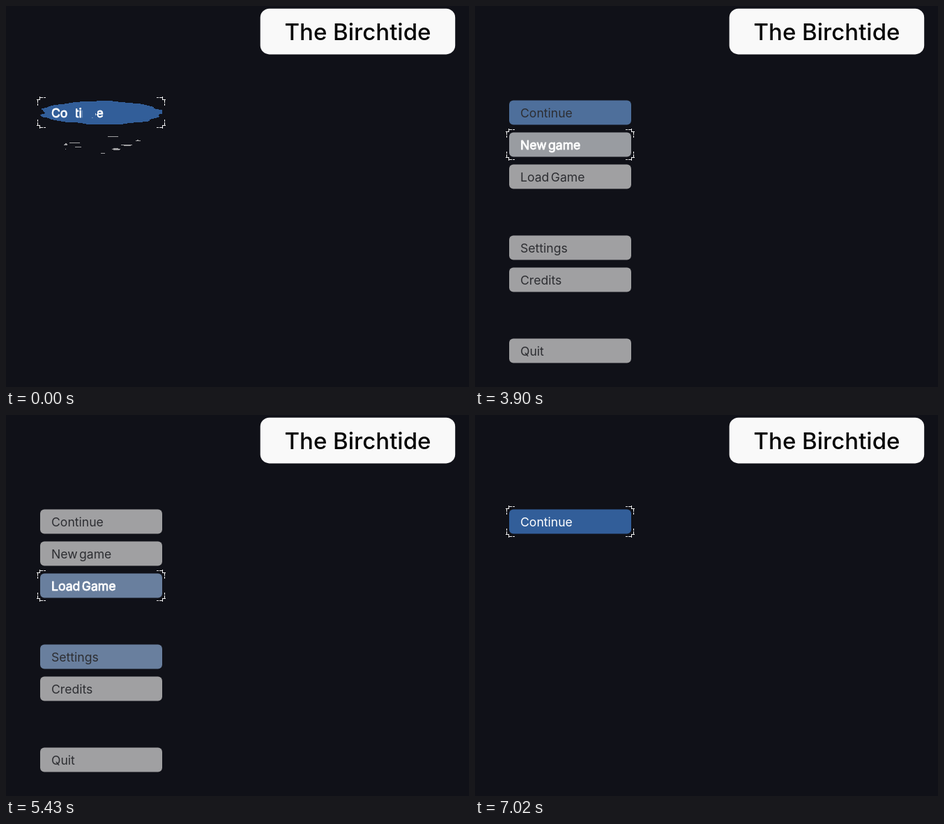
Recreate the animation shown at these times as an HTML page with a canvas. Size 664 px wide and 547 px high, loop 8.49 s.

```html
<!DOCTYPE html>
<html lang="en">
<head>
<meta charset="utf-8">
<title>Game menu</title>
<style>
html, body { margin: 0; width: 100%; height: 100%; overflow: hidden; background: #101118; }
canvas { display: block; }
</style>
</head>
<body>
<canvas id="stage" width="664" height="547"></canvas>
<script>
const LOOP = 8490, STEP = 30;
const LEFT = 49, W = 175, H = 35;
const GRAY = [160, 160, 162], BLUE = [50, 94, 153], PRESSED = [72, 124, 174];
const FONT = '400 17.6px Inter, "Open Sans", sans-serif';
const STAGGER = 290, FULL = 520, EMPTY = -80;
const EXIT = 6180, EXIT_STAGGER = 60;

const items = [
  ['Continue', 135], ['New game', 181], ['Load Game', 227],
  ['Settings', 329], ['Credits', 375], ['Quit', 477]
].map(([label, top]) => ({ label, top }));

// [time, selected item]
const moves = [
  [-999, 0], [3900, 1], [4140, 2], [4320, 3], [4470, 4], [4800, 3],
  [4920, 2], [5250, 3], [5400, 2], [5550, 1], [5730, 0]
];
const letterDelay = [215, 225, 340, 220, 230, 330, 280, 235, 485];
const radiusKeys = [[EMPTY, 0.3], [0, 0.65], [200, 0.91], [290, 0.98], [490, 1.26], [FULL, 1.5]];
const coverKeys = [[EMPTY, 0], [0, 0.15], [150, 1.1]];

const ctx = document.getElementById('stage').getContext('2d');
const layer = () => {
  const c = document.createElement('canvas');
  c.width = W;
  c.height = H + 1;
  return c.getContext('2d', { willReadFrequently: true });
};
const plate = layer(), text = layer();

const clamp = x => Math.max(0, Math.min(1, x));
const mix = (a, b, k) => a + (b - a) * k;
const mixColor = (a, b, k) => a.map((v, i) => mix(v, b[i], k));
const rgb = c => `rgb(${c.map(Math.round).join(',')})`;
const easeInOut = p => p < 0.5 ? 4 * p ** 3 : 1 - 4 * (1 - p) ** 3;
const smooth = p => p * p * (3 - 2 * p);

function along(keys, t) {
  if (t <= keys[0][0]) return keys[0][1];
  for (let i = 1; i < keys.length; i++) {
    const [a, va] = keys[i - 1], [b, vb] = keys[i];
    if (t <= b) return mix(va, vb, (t - a) / (b - a));
  }
  return keys[keys.length - 1][1];
}

function hash(x, y) {
  const s = Math.sin(x * 127.1 + y * 311.7) * 43758.5453;
  return s - Math.floor(s);
}

function noise(x, y) {
  const ix = Math.floor(x), iy = Math.floor(y);
  const u = smooth(x - ix), v = smooth(y - iy);
  return mix(mix(hash(ix, iy), hash(ix + 1, iy), u),
             mix(hash(ix, iy + 1), hash(ix + 1, iy + 1), u), v);
}

function roundRect(c, x, y, w, h, r, fill) {
  c.beginPath();
  c.roundRect(x, y, w, h, r);
  c.fillStyle = fill;
  c.fill();
}

function mask(c, visible) {
  const img = c.getImageData(0, 0, W, H + 1);
  for (let y = 0, k = 3; y <= H; y++)
    for (let x = 0; x < W; x++, k += 4)
      if (img.data[k] && !visible(x, y)) img.data[k] = 0;
  c.putImageData(img, 0, 0);
}

function dissolvePlate(i, local) {
  const radius = along(radiusKeys, local), cover = along(coverKeys, local);
  mask(plate, (x, y) => {
    const n = noise(x / 18 + i * 17, y / 3 + i * 31);
    const d = Math.hypot((x - W / 2) / (W / 2), (y - 17.5) / (H / 2));
    return n < cover && d + 0.15 * (n - 0.5) < radius;
  });
}

function dissolveText(i, local) {
  const label = items[i].label;
  const ends = [...label].map((_, k) => 16.5 + text.measureText(label.slice(0, k + 1)).width);
  mask(text, (x, y) => {
    const k = Math.max(0, ends.findIndex(e => x < e));
    return local > letterDelay[k] + 40 * noise(x / 5 + i * 13, y / 2.5);
  });
}

function localTime(i, t) {
  if (t < EXIT || i === 0) return t - (i - 1) * STAGGER;
  return FULL - (t - EXIT + STEP - (i - 1) * EXIT_STAGGER);
}

function selection(t) {
  let k = moves.length - 1;
  while (moves[k][0] > t) k--;
  return {
    now: moves[k][1],
    before: k ? moves[k - 1][1] : -1,
    p: clamp((t - moves[k][0] + STEP) / 120)
  };
}

function drawItem(i, t, sel) {
  const local = localTime(i, t);
  if (local <= EMPTY) return;
  const { label, top } = items[i], active = i === sel.now;
  const amount = active ? easeInOut(sel.p) : i === sel.before ? 1 - sel.p : 0;
  const press = t < EXIT ? 0 : 1 - clamp((t - EXIT) / 120);

  plate.clearRect(0, 0, W, H + 1);
  roundRect(plate, 0, 0.5, W, H, 6, rgb(mixColor(GRAY, mixColor(BLUE, PRESSED, press), amount)));

  text.clearRect(0, 0, W, H + 1);
  text.font = FONT;
  text.wordSpacing = '-2.5px';
  text.fillStyle = text.strokeStyle = active ? '#fff' : '#2d2e32';
  text.fillText(label, 16, 24.5);
  const bold = 0.8 * (1 - clamp((t - EXIT) / 600));
  if (active && bold > 0) {
    text.lineWidth = bold;
    text.lineJoin = 'round';
    text.strokeText(label, 16, 24.5);
  }

  if (local < FULL) {
    dissolvePlate(i, local);
    dissolveText(i, local);
  }
  ctx.drawImage(plate.canvas, LEFT, top);
  ctx.drawImage(text.canvas, LEFT, top);
}

function drawBrackets(top) {
  ctx.fillStyle = '#f4f4f4';
  for (const sx of [1, -1])
    for (const sy of [1, -1]) {
      ctx.save();
      ctx.translate(sx > 0 ? 45 : 228, sy > 0 ? top - 4 : top + 40);
      ctx.scale(sx, sy);
      // broken arms
      ctx.fillRect(4, 0, 4, 1);
      ctx.fillRect(9, 0, 3, 1);
      ctx.fillRect(0, 4, 1, 4);
      ctx.fillRect(0, 9, 1, 3);
      // crossed corner
      ctx.fillRect(3, -1, 1, 5);
      ctx.fillRect(-1, 3, 5, 1);
      ctx.restore();
    }
}

function drawTitle() {
  roundRect(ctx, 364.7, 3.8, 279.5, 65.6, 13, '#f9f9f9');
  ctx.font = '500 33px Inter, "Open Sans", sans-serif';
  ctx.textAlign = 'center';
  ctx.fillStyle = '#050505';
  ctx.fillText('The Birchtide', 504.5, 49);
}

function draw(t) {
  ctx.fillStyle = '#101118';
  ctx.fillRect(0, 0, 664, 547);
  drawTitle();
  const sel = selection(t);
  items.forEach((_, i) => drawItem(i, t, sel));
  drawBrackets(items[sel.now].top);
}

const start = performance.now();
function tick() {
  const t = (performance.now() - start) % LOOP;
  draw(Math.floor(t / STEP) * STEP);
  requestAnimationFrame(tick);
}
tick();
</script>
</body>
</html>
```
